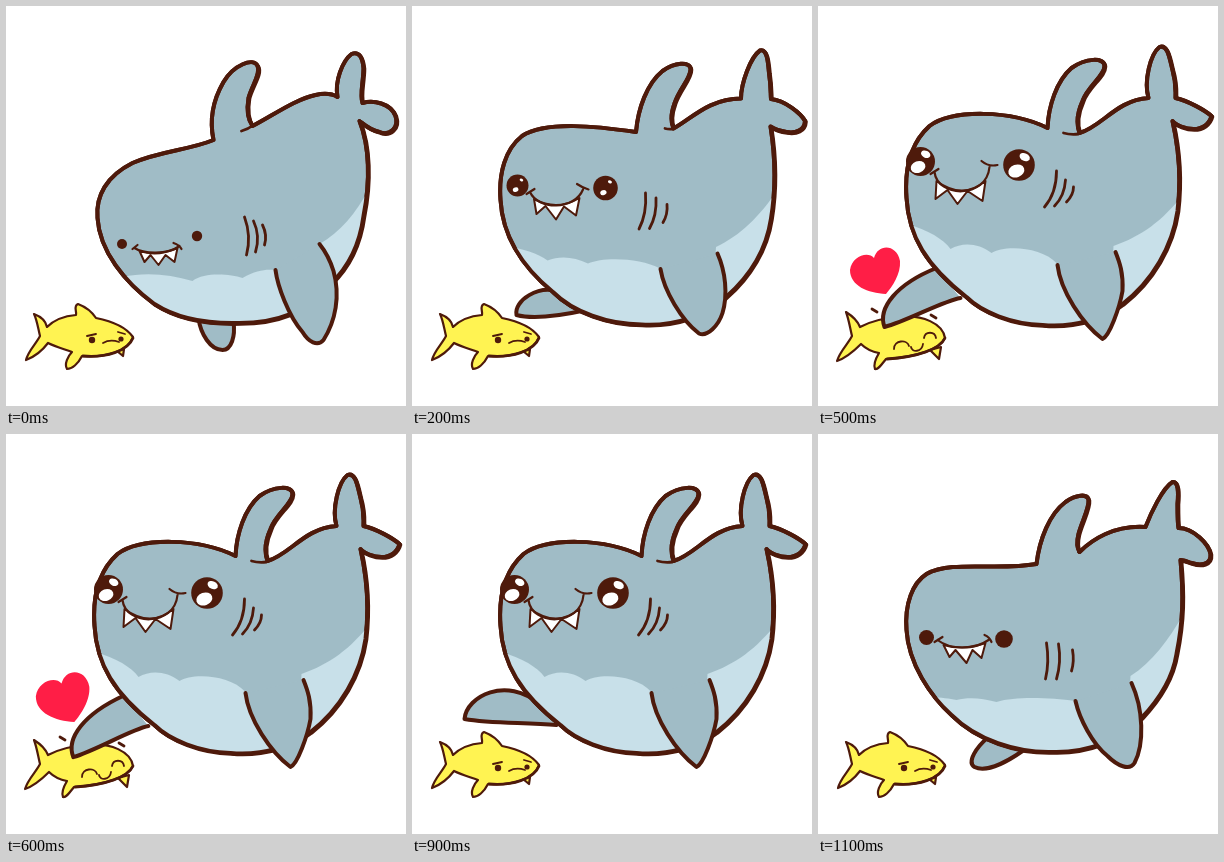
An HTML page for the animation above (1.2 s loop, 400 by 400 pixels).

```html
<!DOCTYPE html>
<html lang="en">
<head>
<meta charset="utf-8">
<title>Shark pats a fish</title>
<style>
html, body { margin: 0; width: 100%; height: 100%; overflow: hidden; background: #fff; }
svg { display: block; width: 100%; height: 100%; }
path { stroke-linecap: round; stroke-linejoin: round; }
.skin { fill: #a0bcc6; stroke: #4e1a0b; stroke-width: 4; }
.weight { fill: #4e1a0b; stroke: #4e1a0b; stroke-width: 4; }
.belly { fill: #c8e0e9; }
.line { fill: none; stroke: #4e1a0b; stroke-width: 2.8; }
.teeth { fill: #fff; stroke: #4e1a0b; stroke-width: 2; }
.dark { fill: #4e1a0b; }
.shine { fill: #fff; }
.fish { fill: #fff352; stroke: #4e1a0b; stroke-width: 2.2; }
.thin { fill: none; stroke: #4e1a0b; stroke-width: 1.8; }
.heart { fill: #ff1e46; }
</style>
</head>
<body>
<svg id="stage" viewBox="0 0 400 400"></svg>
<script>
const stage = document.getElementById('stage');

// Eyes hold x, y, radius twice, then the strength of the shine.
const calm = {
  body: 'M93 212C91 190 102 170 128 157C155 145 185 144 209 134C205 115 208 95 219 76C229 59 249 51 253 60C257 67 247 80 244 92C242 104 243 113 248 120C266 111 291 93 311 89C320 87 328 88 333 91C330 75 338 55 347 48C355 45 358 52 359 62C359 76 355 88 358 97C369 94 386 97 391 110C395 122 385 130 375 126C365 124 359 118 355 115C365 140 366 175 359 210C355 240 343 262 326 278C305 306 270 317 235 317C200 318 170 311 150 298C120 276 95 245 93 212Z',
  belly: 'M118 271C140 266 165 268 188 275C200 266 225 268 238 272C252 264 262 263 270 264L275 273L314 248L315 238C336 226 351 208 365 182L370 330L100 330Z',
  near: 'M271 264C273 280 284 310 298 326C304 336 313 341 319 334C331 315 336 290 329 265C325 252 319 243 315 238',
  far: 'M229 316C231 330 227 344 218 344C206 344 196 328 194 312',
  tick: 'M237 125Q244 123 249 119',
  gills: 'M240 211Q247 230 242 249M249 215Q256 230 251 246M258 219Q263 229 260 239',
  eyes: '117.5 238 5 192.5 230 5.2 0',
  teeth: 'M135 245L140 256L146 249L154 259L161 249L170 256L173 242Q153 251 135 245Z',
  mouth: 'M130 242C139 248 163 249 175 240M128 243L133 239M169 237Q175 239 177 243'
};
const eager = {
  body: 'M90 196C88 170 96 149 110 140C135 126 180 137 220 130C223 105 233 80 249 68C259 61 271 59 272 66C273 74 265 88 262 100C260 108 260 113 263 118C275 106 297 91 329 93C334 80 346 54 356 48C362 47 362 59 361 70C361 82 361 89 362 94C377 94 392 110 394 120C395 131 384 132 375 129C369 127 367 126 364 126C367 160 367 185 360 220C356 245 343 265 325 284C306 306 270 319 236 318C200 319 160 306 135 281C114 262 92 230 90 196Z',
  belly: 'M100 264C118 262 130 264 140 266C152 263 165 264 180 268C200 262 235 264 258 267L263 276L313 258L314 242C336 228 352 206 367 180L370 330L90 330Z',
  near: 'M259 267C263 285 276 310 291 322C301 332 313 337 318 329C328 310 327 275 315 249',
  far: 'M206 317C186 331 168 338 158 333C150 328 160 313 172 303',
  tick: 'M262 118Q262 118 263 118',
  gills: 'M230 209Q233 228 229 245M242 210Q245 228 240 245M256 216Q258 227 255 237',
  eyes: '110 203.5 7.5 187.5 205 8.8 0',
  teeth: 'M127 211L133 223L139 216L150 229L156 216L165 224L169 209Q147 217 127 211Z',
  mouth: 'M121 206C134 216 158 216 172 206M118 208L126 203M168 201Q173 203 175 208'
};
const smitten = {
  body: 'M90 192C88 165 93 138 113 120C136 103 195 104 231 122C232 100 240 75 255 62C269 52 288 51 288 60C288 70 271 80 266 95C261 106 259 116 263 127C285 121 300 94 332 92C327 75 334 48 343 41C351 38 353 52 356 64C360 78 359 86 359 92C372 95 388 104 395 110C393 118 386 123 377 123C369 123 359 119 356 115C364 150 364 180 361 205C356 240 336 275 306 298C290 311 260 322 226 319C195 318 165 306 150 291C110 260 92 230 90 192Z',
  belly: 'M80 215C108 222 126 232 134 243C146 236 162 237 175 247C187 239 225 240 241 258L247 268L296 258L297 240C325 230 345 216 368 187L370 330L90 330Z',
  near: 'M241 259C244 285 266 318 286 333C293 330 303 302 306 285C307 267 303 256 299 246',
  far: 'M146 291C116 288 81 290 54 285C56 262 96 242 129 270',
  tick: 'M247 127Q254 129 262 128',
  gills: 'M240 165Q240 187 228 201M249 174Q248 190 238 200M257 181Q257 189 250 196',
  eyes: '104 155.5 14.5 202.5 159 15.8 1',
  teeth: 'M120 175L119 193L131 184L141 198L151 185L166 195L169 175Q146 194 120 175Z',
  mouth: 'M118 166C121 192 170 193 173 161M114 168L122 163M165 155Q172 161 181 159'
};

const blend = (a, b, t) => {
  const to = b.match(/-?[\d.]+/g);
  let i = 0;
  return a.replace(/-?[\d.]+/g, n => +n + (to[i++] - n) * t);
};
const between = (a, b, t) =>
  Object.fromEntries(Object.keys(a).map(k => [k, blend(a[k], b[k], t)]));

const patFin = 'M144 292C126 295 91 315 68 321C61 302 80 278 120 262';
const patting = { ...smitten, far: patFin };
const pressing = { ...smitten, far: blend(smitten.far, patFin, 1.06) };

const path = (kind, d, extra = '') => `<path class="${kind}" d="${d}" ${extra}/>`;
const oval = (kind, x, y, rx, ry = rx, turn = 0) =>
  `<ellipse class="${kind}" rx="${rx}" ry="${ry}" transform="translate(${x} ${y}) rotate(${turn})"/>`;

function eye(x, y, r, shine) {
  const glint = shine ? oval('shine', x - r * .17, y + r * .38, r * .52 * shine, r * .4 * shine, -20) +
    oval('shine', x + r * .36, y - r * .5, r * .34 * shine, r * .24 * shine, 25) : '';
  return oval('dark', x, y, r) + glint;
}

function shark(p) {
  const [lx, ly, lr, rx, ry, rr, shine] = p.eyes.split(' ').map(Number);
  return '<g transform="translate(-1.5 0)">' + path('skin', p.far) +
    path('weight', p.body, 'transform="translate(.8 .8)"') +
    path('skin', p.body) +
    `<clipPath id="inside"><path d="${p.body}"/></clipPath>` +
    `<g clip-path="url(#inside)">${path('belly', p.belly)}</g>` +
    path('skin', p.body, 'style="fill:none"') +
    path('skin', p.near) +
    path('line', p.tick + p.gills) +
    path('teeth', p.teeth) + path('line', p.mouth, 'style="stroke-width:2.2"') +
    eye(lx, ly, lr, shine) + eye(rx, ry, rr, shine) + '</g>';
}

const sadFish =
  path('fish', 'M111 345L117 350L118 343Z') +
  path('fish', 'M41 321C48 314 58 310 70 309C71 305 67 300 72 298C80 301 86 306 90 312C105 315 120 321 127 331C122 345 100 352 76 350C72 358 66 363 61 363C58 358 62 350 66 346C58 343 50 341 42 337C36 345 28 351 20 354C22 345 30 338 34 330C32 322 31 314 28 308C36 311 40 316 41 321Z') +
  path('line', 'M127 332C122 345 100 352 77 350') +
  oval('dark', 86, 334, 3.2) + oval('dark', 115, 333, 2.6) +
  path('thin', 'M81 330L90 328M112 326L119 328M97 337Q104 333 113 336');

const happyFish =
  path('fish', 'M112 344L121 353L123 341Z') +
  path('fish', 'M42 321C55 314 66 312 80 311C105 308 125 318 127 332C122 343 100 351 68 353C64 358 60 364 57 363C55 358 58 352 61 347C50 345 46 341 43 338C36 345 28 352 19 355C22 345 30 338 34 330C32 322 31 314 28 306C36 311 40 316 42 321Z') +
  path('line', 'M127 332C122 343 100 351 69 353') +
  path('thin', 'M76 343C76 334 89 333 91 340M106 332C107 325 117 325 118 332M93 341C94 347 104 346 105 338') +
  path('line', 'M54 303L59 306M113 309L118 312');

const heart = size => path('heart',
  'M56 252C50 245 34 250 32 264C32 280 50 287 68 288C74 281 83 268 82 255C79 238 60 237 56 252Z',
  `transform="translate(63 288) scale(${size}) translate(-63 -288)"`);

const scenes = [
  sadFish + shark(calm),
  sadFish + shark(eager),
  sadFish + shark(between(eager, smitten, .5)),
  sadFish + shark(smitten),
  sadFish + shark(between(smitten, patting, .5)),
  happyFish + shark(patting) + heart(1),
  happyFish + shark(pressing) + heart(1.07)
];

let shown = -1;
function draw(now) {
  const step = Math.floor(now % 1200 / 100);
  const scene = Math.min(step, 12 - step);
  if (scene !== shown) {
    stage.innerHTML = scenes[scene];
    shown = scene;
  }
  requestAnimationFrame(draw);
}
draw(performance.now());
</script>
</body>
</html>
```
